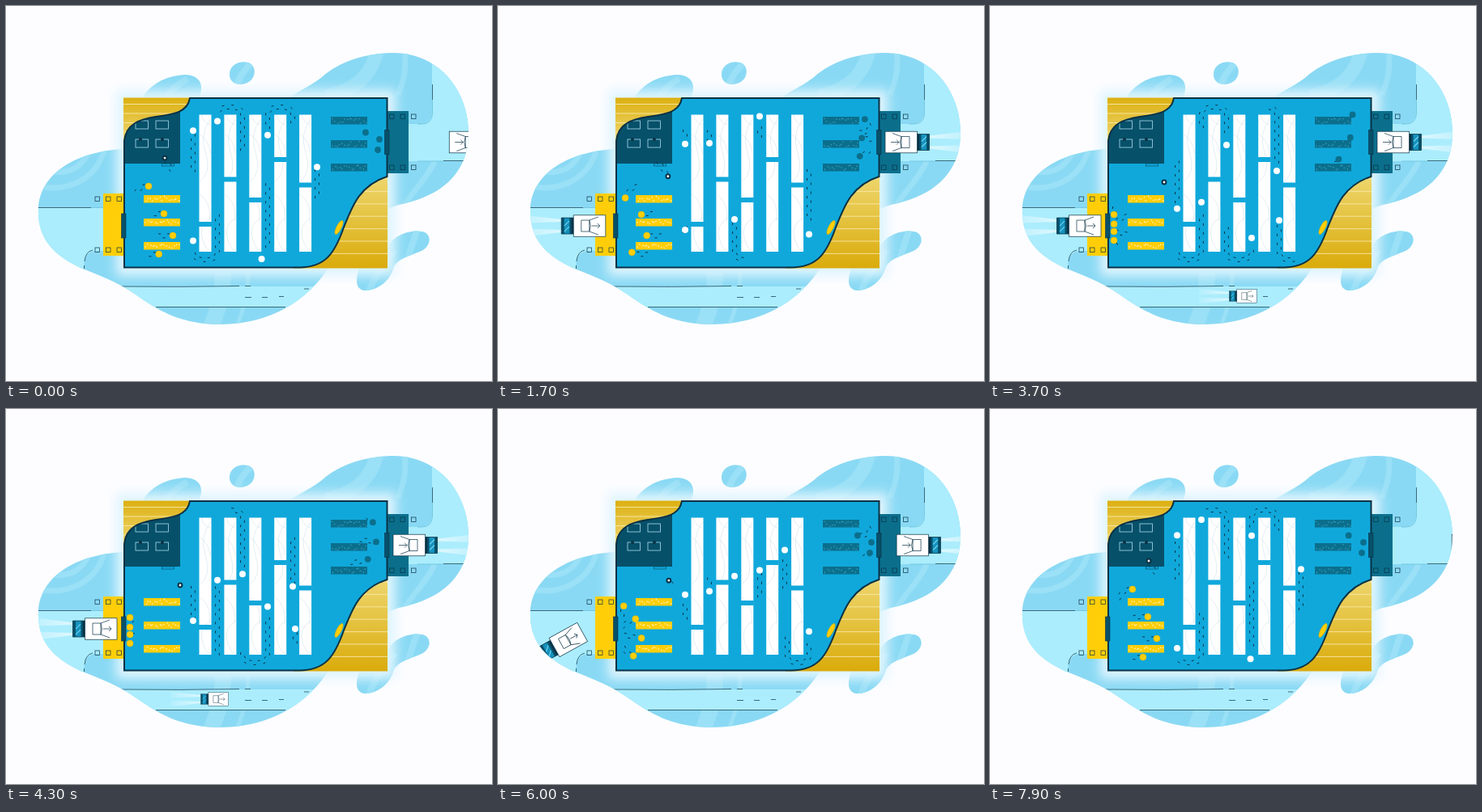
Animation of 600 by 464 pixels, one loop 8 s. Source, as an HTML page:

```html
<!DOCTYPE html>
<html lang="en">
<head>
<meta charset="utf-8">
<title>Warehouse</title>
<style>
html, body { margin: 0; width: 100%; height: 100%; overflow: hidden; background: #fdfdff; }
svg { display: block; width: 100vw; height: 100vh; }
</style>
</head>
<body>
<svg id="stage" viewBox="0 0 600 464" fill="none"></svg>
<script>
const LOOP = 8000;
const NAVY = '#0a3145', DEEP = '#07506a', TEAL = '#0b6f8c', BLUE = '#10a8db',
  YELLOW = '#ffce08', WATER = '#8ad9f4', ROAD = '#abedfd', SHEEN = '#9ae0f6';

const stage = document.getElementById('stage');
const rect = (x, y, w, h, attrs) => `<rect x="${x}" y="${y}" width="${w}" height="${h}" ${attrs}/>`;
const path = (d, attrs) => `<path d="${d}" ${attrs}/>`;
const line = (d, color = NAVY, width = .7) => path(d, `stroke="${color}" stroke-width="${width}"`);
const range = (n, fn) => Array.from({ length: n }, (_, i) => fn(i)).join('');
const clamp = v => Math.max(0, Math.min(1, v));
const wrap = t => (t % LOOP + LOOP) % LOOP;

let seed = 7;
const random = () => (seed = seed * 16807 % 2147483647) / 2147483647;

const LAND = 'M40 250C42 210 82 180 146 177L300 220L330 130C352 108 372 102 390 88C412 68 445 58 480 58' +
  'C535 59 571 105 571 157C571 205 540 235 485 246C455 255 420 290 398 324C384 346 345 394 262 394' +
  'C215 393 190 378 160 357C140 343 118 334 92 324C62 310 38 290 40 250Z';
const DROPS = 'M168 114C178 98 195 86 222 85C240 86 245 98 238 114Z' +
  'M276 86C275 73 288 67 299 70C309 73 309 87 301 93C292 100 277 98 276 86Z' +
  'M470 300C480 280 505 276 517 280C526 285 524 297 513 303C498 310 483 312 478 325' +
  'C473 343 455 353 442 352C431 350 431 338 437 322Z';
const FLOOR = 'M227 114H470.5V211C436 222 427 249 417 274C406 305 395 323.5 362 323.5H146V167' +
  'C148 146 165 140 185 137C206 134 224 132 227 114Z';

function scenery() {
  const sheen = line('M395 112C430 105 452 85 458 55', SHEEN, 17) +
    line('M484 110C490 95 495 78 492 55M490 250C500 230 520 215 530 190', SHEEN, 7) +
    line('M36 222C75 232 112 215 122 176M56 205C80 208 95 198 102 180', SHEEN, 7) +
    line('M252 400C262 375 268 355 268 330', SHEEN, 20) +
    line('M285 396C296 370 299 350 299 330', SHEEN, 5);
  const dropSheen = line('M198 114C203 104 211 97 224 90M284 100C288 88 293 80 304 70' +
    'M448 356C452 335 470 318 480 302M496 312L508 276', SHEEN, 8);
  const roads = path('M526 50H580V192H465V146H510Q526 146 526 131Z' +
    'M30 249H150V303H112Q96 303 96 325V350H30Z M130 347H410V373H130Z', `fill="${ROAD}"`);
  const kerbs = line('M526.5 97V116M540 191.5H571M40 249.5H105M96.5 325V321' +
    'M97 316Q98 304 107 302M140 347Q215 348 288 346.5M295 346.5H302M368 350H374' +
    'M185 372.5H345M295 360.5H303M316 360.5H323M337 359.5H343') +
    line('M526.5 116V133Q526 146 513 146H508M508 192H540M105 249.5H120', '#5fb9d6');
  return path(LAND, `fill="${WATER}"`) + path(DROPS, `fill="${WATER}"`) +
    `<g clip-path="url(#land)">${sheen}${roads}${kerbs}</g>` +
    `<g clip-path="url(#drops)">${dropSheen}</g>` +
    rect(136, 104, 345, 230, 'fill="#e0f5fe" filter="url(#soft)"');
}

function docks() {
  const posts = (x, y) => range(6, i => rect(x + 13.5 * (i % 3), y + 63 * (i > 2), 5.5, 5.5,
    `stroke="${NAVY}" stroke-width=".7"`));
  return rect(120, 232, 26, 77, `fill="${YELLOW}"`) + rect(471, 130, 26, 77, `fill="${TEAL}"`) +
    posts(110, 236) + posts(473.5, 134);
}

const shelves = (x, y, fill, speck) => range(3, row => {
  const top = y + row * 29;
  const marks = range(15, i => {
    const a = random() * 2 * Math.PI;
    return `M${x + 2.5 + i * 2.9} ${top + 2 + random() * 6}l${1.8 * Math.cos(a)} ${1.8 * Math.sin(a)}`;
  });
  return rect(x, top, 45, 9.5, `fill="${fill}"`) + line(marks, speck, 1.1);
});

function rack(x, gap) {
  const curves = `M${x} 158q12 8 14 24M${x + 14} 140q-14 18 -6 42t-8 36M${x} 232q16 12 13 34` +
    `M${x + 14} 262q-15 10 -10 26t10 14M${x + 3} 135q2 10 11 12`;
  return rect(x, 134.5, 15, 169.5, 'fill="#fff"') + line(curves, '#cfe2ec', .6) +
    rect(x - .5, gap, 16, 6, `fill="${BLUE}"`);
}

function building() {
  const planks = range(4, i => `M145 ${121.5 + i * 11.5}h85`) +
    range(7, i => `M362 ${214 + i * 15.4}h109`);
  const desks = range(4, i => rect(160 + 25 * (i % 2), 142 + 23 * (i > 1), 15.5, 10,
    'stroke="#a9dcec" stroke-width=".8"'));
  const chairs = range(2, i => `<circle cx="${166 + 27 * i}" cy="165" r="2" fill="${NAVY}"/>`);
  const office = rect(146, 130, 69, 65, `fill="${DEEP}"`) + desks + chairs +
    rect(192.5, 195, 15, 3, `stroke="${DEEP}" stroke-width=".7"`);
  const door = (x, y) => rect(x, y, 5.5, 30, `fill="${DEEP}" stroke="${NAVY}" stroke-width=".6"`);
  return rect(145, 113.5, 90, 60, 'fill="url(#goldA)"') + rect(355, 205, 116, 119.5, 'fill="url(#goldB)"') +
    line(planks, '#f8e9a4', .9) + path(FLOOR, `fill="${BLUE}"`) +
    `<g clip-path="url(#floor)">${office}</g>` +
    [267, 211.5, 237, 187, 218.5].map((gap, i) => rack(238.5 + i * 30.9, gap)).join('') +
    shelves(170, 234, YELLOW, '#fff6cf') + shelves(401, 137, TEAL, '#2f9dbd') +
    path(FLOOR, `stroke="${NAVY}" stroke-width="2"`) + door(142.5, 257) + door(467.5, 153.5) +
    `<ellipse cx="411" cy="274" rx="3" ry="9.5" fill="${YELLOW}" stroke="#e2ae00" stroke-width=".6" transform="rotate(27 411 274)"/>`;
}

// Rear door at the origin, cab to the right; the arrow always points right on screen.
function truck(id, flipped) {
  const arrow = flipped ? 'M17 0H7M10 -3L7 0L10 3' : 'M7 0H17M14 -3L17 0L14 3';
  return `<g id="${id}">` +
    path('M55 -8L115 -15V-3L55 -5ZM55 8L115 15V3L55 5Z', 'fill="url(#beam)"') +
    rect(39, -10, 15.5, 20, `fill="${DEEP}" stroke="${NAVY}" stroke-width=".7"`) +
    rect(44.5, -9.5, 6.5, 19, 'fill="#1592bd"') +
    line('M45 -1L51 -7M45 6L51 0', '#6fd0ec', 1.2) + line('M41 -10V10', NAVY, 2) +
    rect(0, -13.3, 39.5, 26.6, `fill="#fff" stroke="${NAVY}" stroke-width=".7"`) +
    line(`M20 -7H30V7H20ZM20 -7L9 -11M20 7L9 11M20 -7Q17 0 20 7${arrow}`) + '</g>';
}

function route(d) {
  const curve = document.createElementNS('http://www.w3.org/2000/svg', 'path');
  curve.setAttribute('d', d);
  const length = curve.getTotalLength();
  const at = s => curve.getPointAtLength(s);
  const heading = s => {
    const a = at(Math.max(0, s - .5)), b = at(Math.min(length, s + .5));
    return Math.atan2(b.y - a.y, b.x - a.x);
  };
  return { length, at, heading };
}

// A walk around one end of a rack, from aisle x1 to aisle x2.
function aroundRack(x1, y1, x2, y2, end) {
  const bend = end + (end < y1 ? 10 : -10);
  return `M${x1} ${y1}V${bend}Q${x1} ${end} ${(x1 + x2) / 2} ${end}Q${x2} ${end} ${x2} ${bend}V${y2}`;
}

const STRIDE = 5.5;
const TOP = 125, BOTTOM = 314;
const walkers = [];

// Walks out and back once per loop, leaving at `start` and resting if `travel` is short.
function walker(kind, d, start, travel) {
  const way = route(d);
  const distance = t => {
    const since = wrap(t - start), away = Math.min(since, LOOP - since);
    return way.length * (1 - Math.cos(Math.PI * clamp(away / travel))) / 2;
  };
  const prints = Array.from({ length: Math.ceil(way.length / STRIDE) }, (_, i) => {
    const { x, y } = way.at(i * STRIDE), a = way.heading(i * STRIDE), side = i % 2 ? 2.4 : -2.4;
    const ux = Math.cos(a), uy = Math.sin(a);
    return `M${x - uy * side - ux * 1.5} ${y + ux * side - uy * 1.5}l${ux * 3} ${uy * 3}`;
  });
  const trail = t => {
    const a = distance(t - 1500), b = distance(t - 200);
    return prints.filter((_, i) => i * STRIDE > Math.min(a, b) && i * STRIDE < Math.max(a, b)).join('');
  };
  walkers.push({ kind, trail, pos: t => way.at(distance(t)) });
}

walker('picker', 'M231 149V263', 550, 4000);
walker('picker', aroundRack(231, 263, 261, 198, BOTTOM), 1000, 4000);
walker('picker', aroundRack(261, 177, 292, 224, TOP), 1180, 4000);
walker('picker', aroundRack(323, 167, 354, 221, TOP), 550, 4000);
walker('picker', aroundRack(292, 264, 323, 196, BOTTOM), 1650, 4000);
walker('picker', aroundRack(384, 198, 357, 265, BOTTOM), -200, 4000);

walker('packer', 'M176 223Q156 222 153 258', 0, 3200);
walker('packer', 'M195 257Q165 256 153 270', 50, 3800);
walker('packer', 'M206 284Q180 286 153 279', 0, 3800);
walker('packer', 'M189 307Q157 310 153 290', -200, 3600);

walker('loader', 'M437 156Q475 160 445 132', -1000, 4000);
walker('loader', 'M433 161L461 165', 2800, 2000);
walker('loader', 'M421 190Q447 190 459 178', 3000, 2200);

walker('clerk', 'M196 188Q204 203 215 218', -100, 2700);

const looks = {
  picker: 'r="4" fill="#fff"',
  packer: `r="4" fill="${YELLOW}" stroke="#eab600" stroke-width=".5"`,
  loader: `r="3.9" fill="${TEAL}"`,
  clerk: `r="2.4" fill="#fff" stroke="${NAVY}" stroke-width="2"`
};

const clip = (id, d) => `<clipPath id="${id}">${path(d, '')}</clipPath>`;
const fade = (id, axis, from, to, a = 1, b = 1) => `<linearGradient id="${id}" ${axis}>` +
  `<stop stop-color="${from}" stop-opacity="${a}"/><stop offset="1" stop-color="${to}" stop-opacity="${b}"/></linearGradient>`;
const DOWN = 'x1="0" y1="0" x2="0" y2="1"';

stage.innerHTML = '<defs>' + clip('land', LAND) + clip('drops', DROPS) + clip('floor', FLOOR) +
  fade('goldA', DOWN, '#dcb011', '#f3dc80') + fade('goldB', DOWN, '#efd872', '#daab0b') +
  fade('beam', '', '#fff', '#fff', .6, .1) +
  '<filter id="soft" x="-20%" y="-20%" width="140%" height="140%"><feGaussianBlur stdDeviation="7"/></filter></defs>' +
  scenery() + docks() +
  `<g clip-path="url(#land)">${truck('outbound')}${truck('inbound', true)}${truck('passing', true)}</g>` +
  building() + `<path id="steps" stroke="${NAVY}"/>` +
  '<g id="people">' + walkers.map(w => `<circle ${looks[w.kind]}/>`).join('') + '</g>';

const [outbound, inbound, passing, steps, people] =
  ['outbound', 'inbound', 'passing', 'steps', 'people'].map(id => document.getElementById(id));

function place(node, x, y, turn, scale = 1) {
  node.setAttribute('transform', `translate(${x} ${y}) rotate(${turn}) scale(${scale})`);
}

const eastRoad = route('M478 168.5H540Q566 168 575 130V-60');
const westRoad = route('M137 272Q112 272 104 276Q84 290 74 320L30 460');

// Backs up to the dock with an ease-out, then pulls away at a steady acceleration.
function haul(node, road, t, { from, span, reach, leave, pull }) {
  const since = wrap(t - from);
  if (since < span) {
    const { x, y } = road.at(0), a = road.heading(0);
    const gap = reach * (1 - since / span) ** 3;
    place(node, x + gap * Math.cos(a), y, a * 180 / Math.PI);
  } else {
    const s = Math.min(road.length, pull * Math.max(0, (from + since - leave) / 1000) ** 2);
    const { x, y } = road.at(s);
    place(node, x, y, road.heading(s) * 180 / Math.PI);
  }
}

function draw(t) {
  haul(outbound, eastRoad, t, { from: -200, span: 1200, reach: 120, leave: 5400, pull: 39 });
  haul(inbound, westRoad, t, { from: 0, span: 2600, reach: 102, leave: 4400, pull: 13 });
  place(passing, 274.5 - (t - 4300) * .0915, 359, 180, .62);
  walkers.forEach((w, i) => {
    const { x, y } = w.pos(t);
    people.children[i].setAttribute('cx', x);
    people.children[i].setAttribute('cy', y);
  });
  steps.setAttribute('d', walkers.map(w => w.trail(t)).join(''));
}

const start = performance.now();
function tick() {
  draw((performance.now() - start) % LOOP);
  requestAnimationFrame(tick);
}
tick();
</script>
</body>
</html>
```
